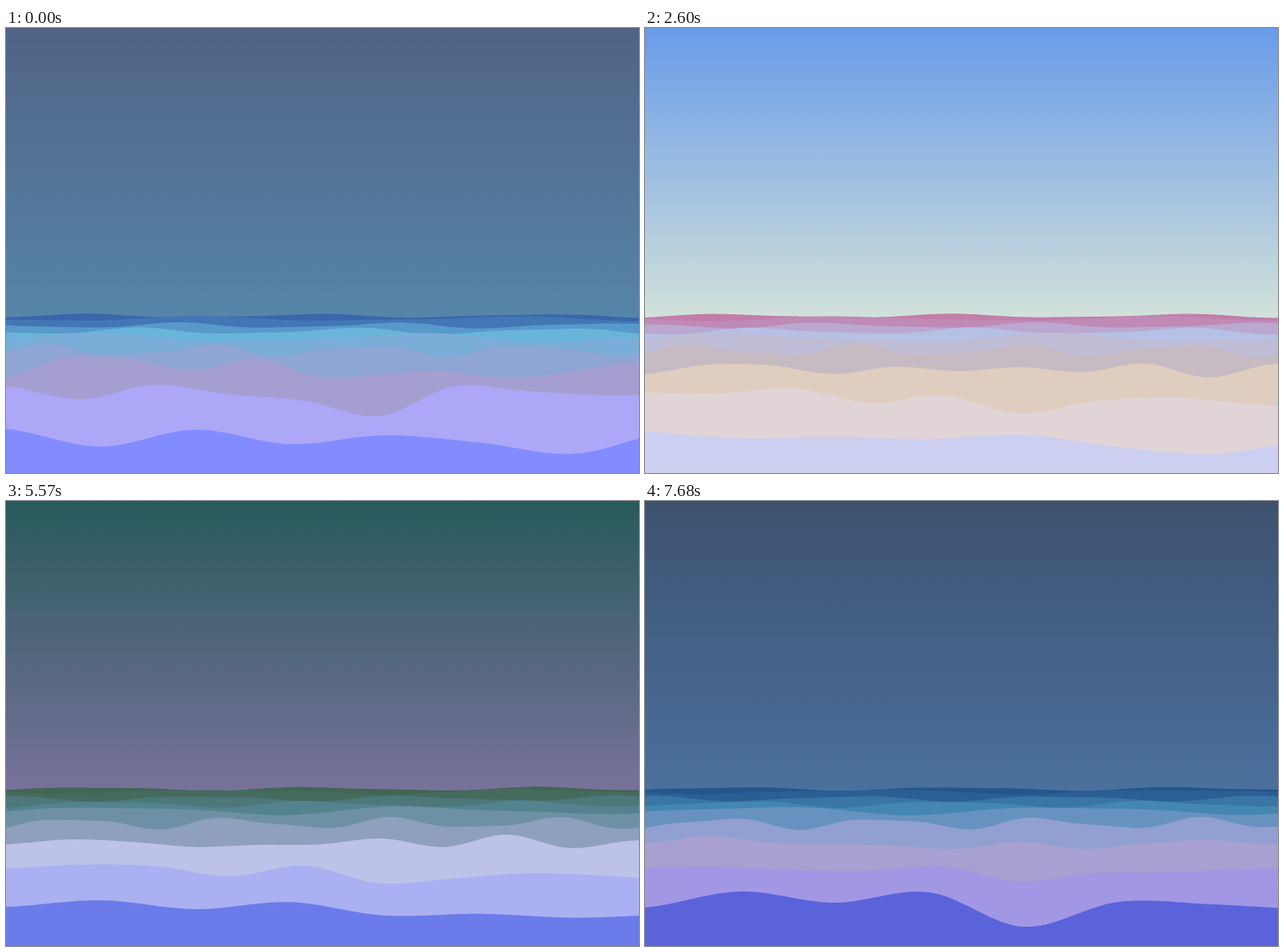
An HTML page with a canvas for the animation above (7.8 s loop, 789 px wide and 555 px high).

```html
<!DOCTYPE html>
<html lang="en">
<head>
<meta charset="utf-8">
<title>Waves through the day</title>
<style>
  html, body { margin: 0; width: 100%; height: 100%; overflow: hidden; }
  canvas { display: block; width: 789px; height: 555px; }
</style>
</head>
<body>
<canvas id="sea" width="789" height="555"></canvas>
<script>
const W = 789, H = 555, HORIZON = 360;
const LOOP = 7800, END = 7680, TICK = 118.5, LEAD = 28;
const ctx = document.getElementById('sea').getContext('2d');

const mix = (a, b, u) => a + (b - a) * u;
const blend = (a, b, u) => a.map((v, i) => mix(v, b[i], u));
const css = c => `rgb(${c.map(Math.round)})`;
const parse = hex => [0, 2, 4].map(i => parseInt(hex.slice(i, i + 2), 16));

// Moods of the day: time, sky top, sky bottom, then the main water tones.
const moods = [
  [0, '506385 5685a8 3867ab 68b4da 8fa5d3 a59fd1 aca7f7 838cff'],
  [930, 'a2c1ec 9dd9f0 5596eb 6bf0ff 92d2f6 a1c2ee a6c0ff 87a3ff'],
  [2600, '689be9 d2e1da c37daa b7bee4 c8bbc2 e0cdbe e1d4d6 ced0f0'],
  [3340, '4882d6 d8d5c8 d07282 d0b2dc d4b2b2 f9d6bc ecd7c8 ddd7e2'],
  [4740, '3a7d7a a893b4 5d784e 679893 96b4c4 c4dbf5 b1c7ff 7a94f8'],
  [6390, '14343c 464f7e 245258 3e6c8a 868ab8 b5a8db a397e5 5b63db'],
  [END, '3e5270 4a709d 24558c 4486b2 91a0d0 a8a0d0 a197e4 5b63db']
].map(([at, tones]) => ({ at, tones: tones.split(' ').map(parse) }));

function coloursAt(t) {
  let k = moods.length - 2;
  while (t < moods[k].at) k--;
  const a = moods[k], b = moods[k + 1];
  const u = (t - a.at) / (b.at - a.at);
  const [top, low, far, bright, mid, ...near] =
    a.tones.map((c, i) => blend(c, b.tones[i], u));
  const water = [far, blend(far, bright, .2), blend(far, bright, .65),
    bright, blend(bright, mid, .45), mid, ...near];
  return { top, low, water };
}

// Far wave: a swell with a crest at x = crest, and a shorter counter-ripple.
const swell = (base, height, length, crest, drift) => (x, s) => {
  const phase = 2 * Math.PI * (x - crest - drift * s) / length;
  return base - height * (Math.cos(phase) + .35 * Math.cos(phase * 1.8 + 4 * s));
};

// Near wave: evenly spaced crest points bending from start through middle to end.
const morph = (gap, start, middle, end) => {
  const height = (i, s) =>
    start[i] * (1 - s) * (1 - 2 * s) + middle[i] * 4 * s * (1 - s) + end[i] * s * (2 * s - 1);
  return (x, s) => {
    const i = Math.floor(x / gap), f = x / gap - i;
    const [a, b, c, d] = [i - 1, i, i + 1, i + 2].map(j =>
      height(Math.max(0, Math.min(start.length - 1, j)), s));
    return b + f / 2 * (c - a + f * (2 * a - 5 * b + 4 * c - d + f * (3 * (b - c) + d - a)));
  };
};

// From the horizon to the front.
const waves = [
  swell(359, 2, 280, 100, 10),
  swell(362.5, 2.5, 380, 240, 40),
  swell(371, 3, 260, 215, 40),
  swell(378, 3.5, 260, 165, -50),
  swell(386, 4.5, 390, 110, 30),
  swell(402, 6, 200, 50, 45),
  morph(78,
    [436, 411, 414, 427, 412, 435, 432, 428, 437, 429, 418, 425],
    [430, 422, 423, 432, 426, 427, 421, 430, 415, 436, 421, 421],
    [427, 418, 426, 428, 430, 434, 425, 434, 427, 423, 428, 430]),
  morph(93,
    [447, 463, 445, 457, 465, 484, 447, 453, 458, 457],
    [457, 454, 452, 469, 456, 479, 470, 463, 469, 477],
    [457, 456, 460, 461, 456, 474, 464, 463, 459, 457]),
  morph(118,
    [500, 522, 501, 519, 508, 517, 531, 504],
    [505, 506, 511, 508, 510, 521, 528, 517],
    [507, 487, 501, 488, 531, 500, 503, 509])
];

function draw(time) {
  const tick = Math.floor((time % LOOP + LEAD) / TICK);
  const t = Math.max(0, Math.min(END, tick * TICK - LEAD));
  const { top, low, water } = coloursAt(t);

  const sky = ctx.createLinearGradient(0, 0, 0, HORIZON);
  sky.addColorStop(0, css(top));
  sky.addColorStop(1, css(low));
  ctx.fillStyle = sky;
  ctx.fillRect(0, 0, W, H);

  waves.forEach((wave, i) => {
    ctx.beginPath();
    ctx.moveTo(0, H);
    for (let x = 0; x <= W + 3; x += 3) ctx.lineTo(x, wave(x, t / END));
    ctx.lineTo(W + 3, H);
    ctx.fillStyle = css(water[i]);
    ctx.fill();
  });
}

const begin = performance.now();
function loop() {
  draw(performance.now() - begin);
  requestAnimationFrame(loop);
}
loop();
</script>
</body>
</html>
```
